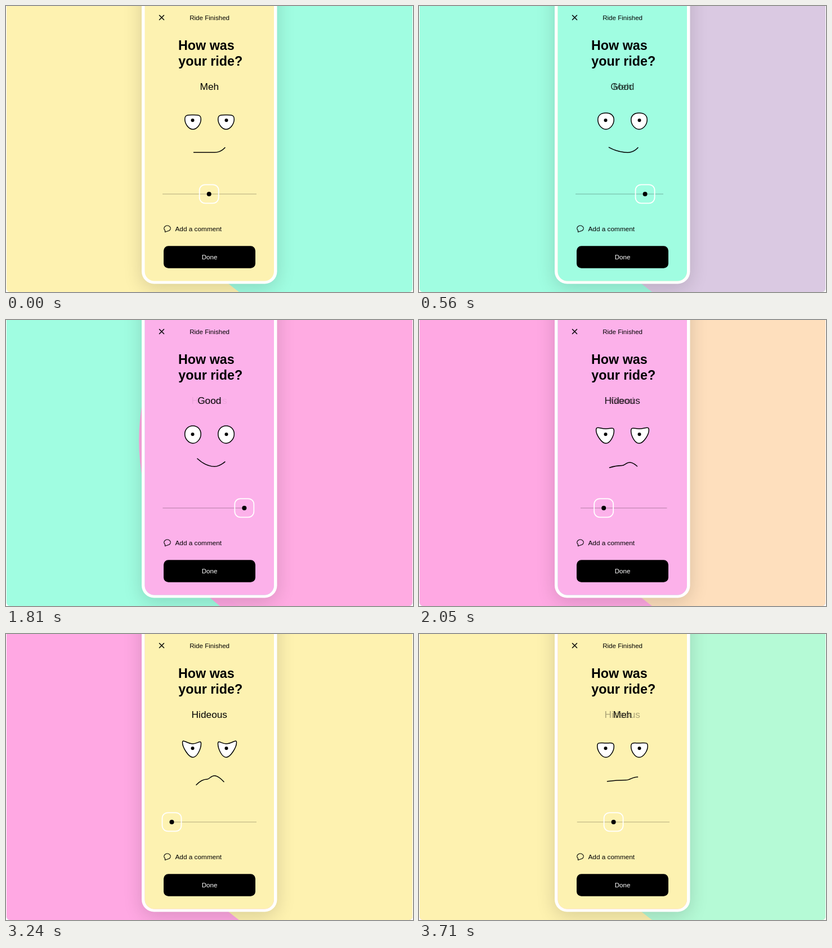
These frames come from a looping animation (723x508 px, 3.74 s). An HTML page:

```html
<!DOCTYPE html>
<html lang="en">
<head>
<meta charset="utf-8">
<title>Ride rating</title>
<style>
  html, body { margin: 0; height: 100%; overflow: hidden; background: #fff; }
  svg { display: block; width: 100vw; height: 100vh; }
  text { font: 11.6px "Liberation Sans", Arial, sans-serif; }
  .title { font-size: 23.3px; font-weight: bold; }
  .mood { font-size: 17.3px; }
  .mid { text-anchor: middle; }
  .line { fill: none; stroke: #000; stroke-width: 1.5; stroke-linecap: round; stroke-linejoin: round; }
  .eye { fill: #fff; }
</style>
</head>
<body>
<svg viewBox="0 0 723 508">
  <defs>
    <clipPath id="stage"><rect x="1" y="-10" width="721" height="518" rx="6"/></clipPath>
    <filter id="blur" x="-50%" y="-20%" width="200%" height="140%"><feGaussianBlur stdDeviation="17"/></filter>
  </defs>

  <g clip-path="url(#stage)">
    <rect id="base" width="723" height="508"/>
    <circle id="wave" cy="214"/>
    <circle id="next" cx="627" cy="214" r="363"/>
    <rect x="241" y="-60" width="240" height="561" rx="22" opacity=".15" filter="url(#blur)"/>
  </g>

  <rect x="241" y="-60" width="240.5" height="553.5" rx="22" fill="#fff"/>
  <rect id="screen" x="246.5" y="-60" width="229.5" height="548.5" rx="17"/>
  <rect id="tint" x="246.5" y="-60" width="229.5" height="548.5" rx="17"/>

  <path class="line" d="M272.5 16.5l8 8m0-8l-8 8"/>
  <text class="mid" x="361.6" y="25">Ride Finished</text>
  <text class="title" x="306" y="78">How was</text>
  <text class="title" x="306.3" y="106">your ride?</text>

  <text class="mood mid" x="361.3" y="149">Meh</text>
  <text class="mood mid" x="361.3" y="149">Good</text>
  <text class="mood mid" x="361.3" y="149">Hideous</text>

  <path class="line eye" transform="translate(332 203)"/>
  <path class="line eye" transform="translate(391 203) scale(-1 1)"/>
  <circle cx="331.5" cy="203" r="3"/>
  <circle cx="391.5" cy="203" r="3"/>
  <path class="line" id="mouth"/>

  <path id="track" stroke="#000" stroke-opacity=".2" stroke-width="1.4"/>
  <g id="knob">
    <rect x="-17" y="317.3" width="34" height="33" rx="10" fill="none" stroke="#fff" stroke-width="1.8"/>
    <circle cy="334" r="4"/>
  </g>

  <path class="line" style="stroke-width:1.1" d="M282.5 398.500A5.800 4.900 0 1 1 287.500 399.800L282.500 401.500Z"/>
  <text x="300.5" y="400" style="font-size:11.8px">Add a comment</text>
  <rect x="280" y="426.3" width="163" height="39.4" rx="8.5"/>
  <text class="mid" x="361.5" y="450" fill="#fff">Done</text>
</svg>

<script>
const LOOP = 3740;

// eye: lid height, then inner and outer corner; mouth: start, dip, pull, end.
// tint and change: start and duration of the steps that lead to the following mood.
const moods = [
  { bg: '#fef2b0', screen: '#fdf2b1', knob: 360.7, track: [278, 445],
    eye: [-9.5, 14.3, -2, -14.3, -2], mouth: [333.5, 260, 371, 260, 384, 257, 389, 251.5],
    tint: [5, 340], change: [175, 715] },
  { bg: '#a0fde1', screen: '#a0fde1', knob: 427.7, track: [278, 427],
    eye: [-15.3, 14.2, 0, -14.2, 0], mouth: [340, 245.5, 371, 260.3, 384, 257, 389, 251.5],
    tint: [1100, 460], change: [1690, 600] },
  { bg: '#ffa8e3', screen: '#fcb1ea', knob: 294.5, track: [290, 445],
    eye: [-8, 14.5, -8, -18.5, -10], mouth: [338, 268, 357, 258, 367, 241, 387, 262.5],
    tint: [2590, 370], change: [3265, 725] }
];

const $ = id => document.getElementById(id);
const words = document.querySelectorAll('.mood');
const eyes = document.querySelectorAll('.eye');

const clamp = v => Math.max(0, Math.min(1, v));
const ease = x => x < .5 ? 4 * x ** 3 : 1 - 4 * (1 - x) ** 3;
const mix = (a, b, p) => a.map((v, i) => v + (b[i] - v) * p);
const set = (el, attrs) => { for (const k in attrs) el.setAttribute(k, attrs[k]); };

const eyePath = ([lid, ix, iy, ox, oy]) =>
  `M0 ${lid}C${.6 * ix} ${lid} ${ix} ${iy - 8} ${ix} ${iy}S${.55 * ix} 16 0 16` +
  `S${ox} ${oy + 8} ${ox} ${oy}S${.6 * ox} ${lid} 0 ${lid}`;

// The mouth runs level through its dip
const mouthPath = ([x, y, dipX, dipY, ...rest]) =>
  `M${x} ${y}Q${(x + dipX) / 2} ${dipY} ${dipX} ${dipY}C${dipX + 7} ${dipY} ${rest.join(' ')}`;

// Which mood is being left at time t, and how far the step has come
function stepAt(kind, t) {
  const i = Math.max(0, moods.findLastIndex(mood => t >= mood[kind][0]));
  const [start, duration] = moods[i][kind];
  return [i, clamp((t - start) / duration)];
}

function draw(t) {
  const [i, x] = stepAt('change', t);
  const p = ease(x);
  const [from, to, after] = [0, 1, 2].map(n => moods[(i + n) % 3]);
  const blend = key => mix(from[key], to[key], p);

  const grow = Math.min(1, 2.12 * p);
  set($('base'), { fill: from.bg });
  set($('wave'), { fill: to.bg, cx: 627 - 266 * grow, r: 363 + 134 * grow });
  set($('next'), { fill: after.bg, opacity: p });

  const [j, tint] = stepAt('tint', t);
  set($('screen'), { fill: moods[j].screen });
  set($('tint'), { fill: moods[(j + 1) % 3].screen, opacity: tint });

  words.forEach((word, k) => set(word, {
    opacity: moods[k] === from ? 1 - p ** 1.5 : moods[k] === to ? 1 - (1 - p) ** 1.6 : 0
  }));
  eyes.forEach(eye => set(eye, { d: eyePath(blend('eye')) }));
  set($('mouth'), { d: mouthPath(blend('mouth')) });

  const [left, right] = blend('track');
  set($('track'), { d: `M${left} 334H${right}` });
  set($('knob'), { transform: `translate(${from.knob + (to.knob - from.knob) * p} 0)` });
}

const began = performance.now();
function frame() {
  draw((performance.now() - began) % LOOP);
  requestAnimationFrame(frame);
}
frame();
</script>
</body>
</html>
```
